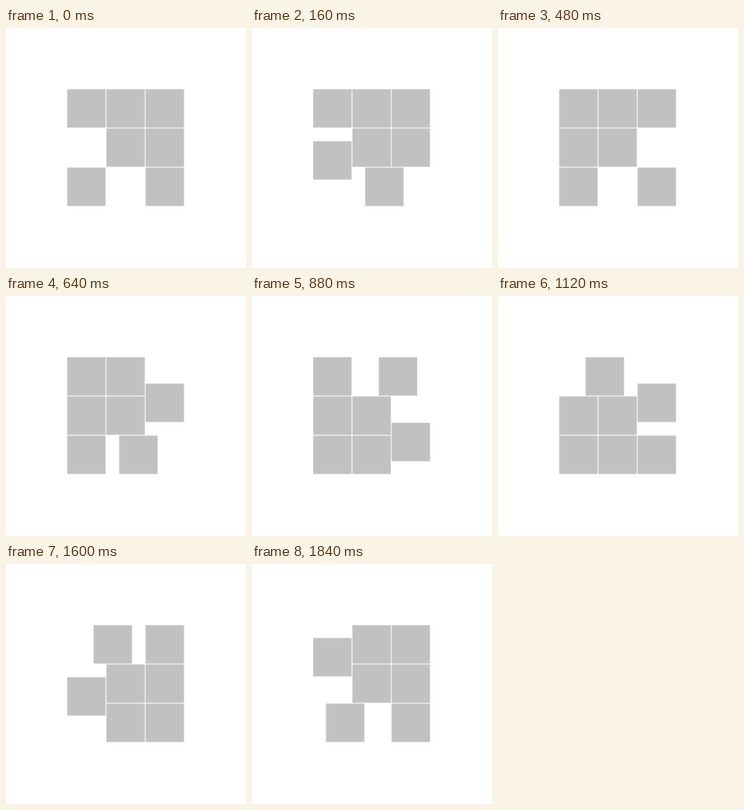
Recreate the animation shown at these times as an HTML page with a canvas. Size 300 by 300 pixels, loop 1920 ms.

```html
<!DOCTYPE html>
<html>
<head>
<meta charset="utf-8">
<style>
html, body { margin: 0; width: 100%; height: 100%; overflow: hidden; background: #fff; }
canvas { display: block; }
</style>
</head>
<body>
<canvas id="stage" width="300" height="300"></canvas>
<script>
const ctx = document.getElementById('stage').getContext('2d');
const LEFT = 76.5, PITCH = 49, SIZE = 48;
const STEP = 80, STEPS_PER_MOVE = 3;

// Outer cells clockwise from the top left, as [column, row].
const ring = [[0, 0], [1, 0], [2, 0], [2, 1], [2, 2], [1, 2], [0, 2], [0, 1]];
const cell = i => ring[(i + 8) % 8];

function tile([col, row]) {
  ctx.fillRect(LEFT + Math.round(col * PITCH), LEFT + Math.round(row * PITCH), SIZE, SIZE);
}

function draw(time) {
  const step = Math.floor(time / STEP) % (8 * STEPS_PER_MOVE);
  const move = Math.floor(step / STEPS_PER_MOVE);
  const part = step % STEPS_PER_MOVE / STEPS_PER_MOVE;

  ctx.fillStyle = '#fff';
  ctx.fillRect(0, 0, 300, 300);
  ctx.fillStyle = '#c1c1c1';
  tile([1, 1]);

  // Two holes travel anticlockwise while their neighbours slide into them.
  for (const hole of [7 - move, 5 - move]) {
    const from = cell(hole - 1), to = cell(hole);
    tile(from.map((v, k) => v + (to[k] - v) * part));
  }
  for (let i = 0; i < 4; i++) tile(cell(8 - move + i));
}

const start = performance.now();
function loop() {
  draw(performance.now() - start);
  requestAnimationFrame(loop);
}
loop();
</script>
</body>
</html>
```
